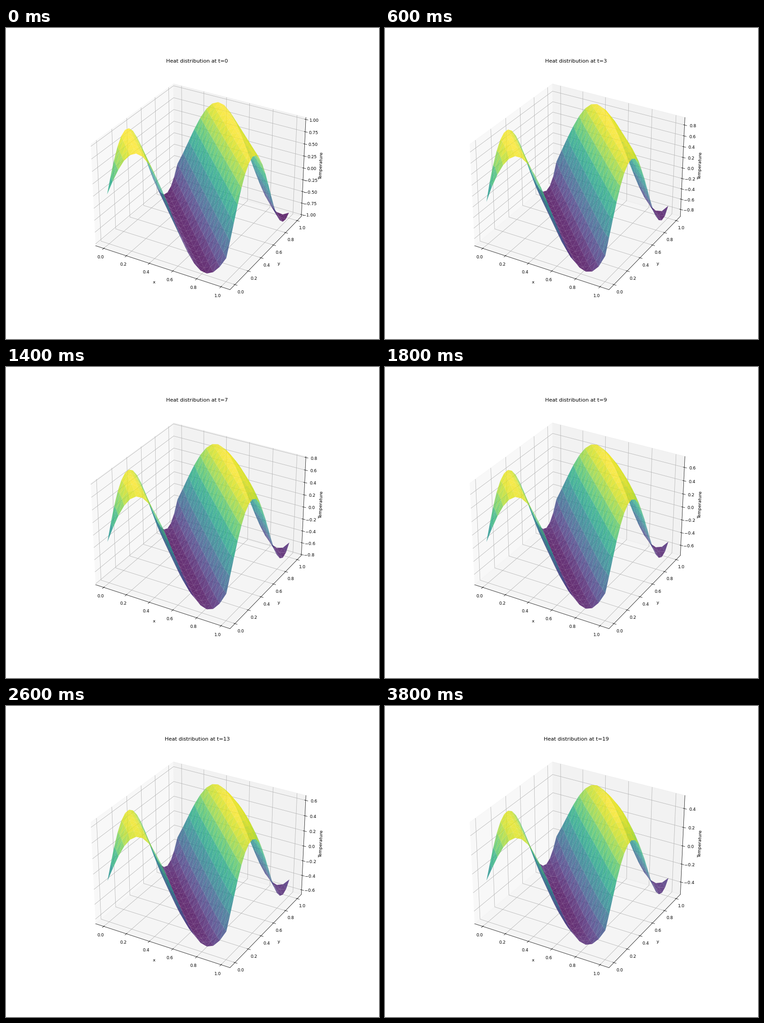
These frames come from a looping animation (820x683 px, 4 s). A matplotlib script:

```python
import numpy as np
import matplotlib.pyplot as plt
from matplotlib.animation import FuncAnimation

DPI = 820 / 12
N = 20          # grid points per side
STEPS = 20
RATE = 0.19     # diffusion number per step


def diffuse(u):
    """One explicit heat step on a periodic grid."""
    around = sum(np.roll(u, d, axis) for d in (-1, 1) for axis in (0, 1))
    return u + RATE * (around - 4 * u)


def grid_triangles(n):
    """Split every cell along its anti-diagonal."""
    idx = np.arange(n * n).reshape(n, n)
    a, b, c, d = (q.ravel() for q in
                  (idx[:-1, :-1], idx[1:, :-1], idx[:-1, 1:], idx[1:, 1:]))
    return np.vstack([np.column_stack([a, b, c]), np.column_stack([b, d, c])])


i, j = np.indices((N, N))
x, y = i.ravel() / (N - 1), j.ravel() / (N - 1)
triangles = grid_triangles(N)

states = [np.sin(0.3 * (i + j))]
while len(states) < STEPS:
    states.append(diffuse(states[-1]))

fig = plt.figure(figsize=(820 / DPI, 683 / DPI), dpi=DPI)
ax = fig.add_subplot(projection="3d")


def update(t):
    ax.clear()
    ax.plot_trisurf(x, y, states[t].ravel(), triangles=triangles,
                    cmap="viridis", edgecolor="none", alpha=0.8)
    ax.set_title(f"Heat distribution at t={t}")
    ax.set_xlabel("x")
    ax.set_ylabel("y")
    ax.set_zlabel("Temperature")


anim = FuncAnimation(fig, update, frames=STEPS, init_func=lambda: None,
                     interval=200, repeat=True, repeat_delay=0)
plt.show()
```
